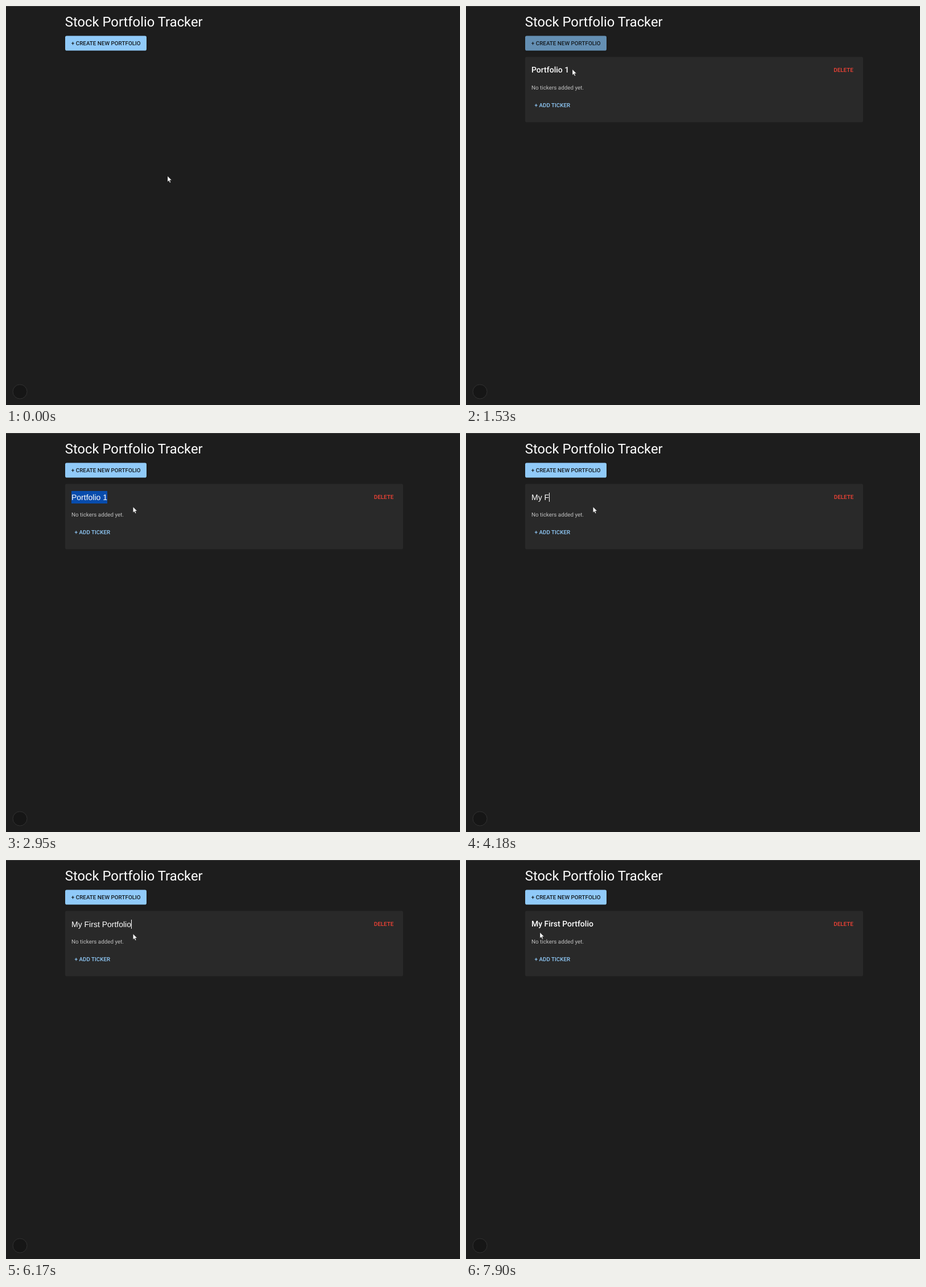
Recreate the animation shown at these times as an HTML page. Size 798 by 702 pixels, loop 8000 ms.

```html
<!DOCTYPE html>
<html lang="en">
<head>
<meta charset="utf-8">
<title>Stock Portfolio Tracker</title>
<style>
  html, body { margin: 0; width: 100%; height: 100%; overflow: hidden; background: #1d1d1d; }
  svg { display: block; }
  text { font-family: Roboto, sans-serif; text-rendering: geometricPrecision; }
  .label { font-size: 9.85px; font-weight: 500; }
  .button { filter: drop-shadow(0 1.4px 1.4px rgba(0, 0, 0, .25)); }
  #heading { font-size: 14px; font-weight: 500; }
  #input { font-family: "Liberation Sans", Arial, sans-serif; font-size: 14px; }
</style>
</head>
<body>
<svg width="798" height="702" viewBox="0 0 798 702">
  <rect width="798" height="702" fill="#1d1d1d"/>
  <rect width="798" height="1" fill="#3e3e3e"/>
  <text x="103.8" y="35.6" font-size="23.8" fill="#fff">Stock Portfolio Tracker</text>

  <rect id="create" class="button" x="104" y="52.5" width="143" height="26" rx="2.8"/>
  <text class="label" x="114.8" y="68.6" fill="#14191d">+ CREATE NEW PORTFOLIO</text>

  <g id="card">
    <rect x="104" y="89.5" width="594" height="115" rx="2.8" fill="#292929"/>
    <text id="heading" x="115" y="116.6" fill="#fff"></text>
    <g id="editor">
      <rect id="selection" x="115" y="102" height="22" fill="rgba(0,86,205,.8)"/>
      <text id="input" x="115" y="118" fill="#fff"></text>
      <rect id="caret" y="105" width="1" height="16" fill="#fff"/>
    </g>
    <text id="delete" class="label" y="116" fill="#f44336">DELETE</text>
    <text x="115" y="147" font-size="9.85" fill="#bfbfbf">No tickers added yet.</text>
    <text class="label" x="120.6" y="178" fill="#90caf9">+ ADD TICKER</text>
  </g>

  <circle cx="24.5" cy="678.5" r="12.5" fill="#161616" stroke="#393939" stroke-width=".8"/>

  <g id="arrow" stroke="#111" stroke-width=".4">
    <path d="M0 0V10L2.3 7.9 3.9 11.6 5.5 10.9 3.9 7.3H7.2Z" fill="#fff"/>
  </g>
  <g id="hand" stroke="#111" stroke-width=".5" stroke-linejoin="round">
    <path fill="#fff" d="M-1.1 .9Q0 -.6 1.1 .9V4.6Q2 3.9 2.9 4.9 3.9 4.5 4.5 5.4 5.6 5.1 6.1 6.3V9.6L5 12V13.8H-.9V12.4L-4 8.5Q-4.3 6.9 -2.8 7.1L-1.1 8.5Z"/>
    <path fill="none" d="M1.1 4.6V7M2.9 4.9V7M4.5 5.4V7.2"/>
  </g>
  <path id="beam" fill="none" stroke="#ddd" stroke-width=".8" d="M-1.8 -5H-.5L0 -4.5 .5 -5H1.8M0 -4.5V4.5M-1.8 5H-.5L0 4.5 .5 5H1.8"/>
</svg>
<script>
  const LOOP = 8000;
  const $ = id => document.getElementById(id);
  const show = (id, on) => $(id).setAttribute("display", on ? "inline" : "none");

  // Each track: [start time, ...values], held until the next entry
  const pointer = [
    [0, "arrow", 284, 299.3], [130, "arrow", 281, 294], [270, "arrow", 268, 273],
    [400, "arrow", 244, 235], [540, "arrow", 212, 183], [680, "arrow", 182, 134],
    [810, "arrow", 160, 97], [950, "hand", 149, 76], [1080, "hand", 146.3, 70],
    [1380, "hand", 150, 72], [1530, "arrow", 187, 111.5], [1650, "beam", 172, 111.5],
    [2070, "beam", 170.5, 111.5], [2360, "arrow", 223.3, 130],
    [7360, "arrow", 196, 120], [7500, "arrow", 128, 96], [7630, "arrow", 55, 81],
    [7770, "arrow", 92, 108], [7900, "arrow", 130, 127.5]
  ];
  const buttonFill = [[0, "#90caf9"], [950, "#80b4de"], [1080, "#6d9ec5"], [1380, "#6795b9"], [1530, "#648fb3"], [1650, "#90caf9"]];
  const typed = [
    [1950, "Portfolio 1"], [3530, "M"], [3800, "My "], [4180, "My F"], [4330, "My Fi"],
    [4480, "My Fir"], [4620, "My First"], [4760, "My First P"], [5070, "My First Por"],
    [5340, "My First Port"], [5500, "My First Portf"], [5670, "My First Portfo"],
    [5840, "My First Portfol"], [6000, "My First Portfoli"], [6170, "My First Portfolio"]
  ];
  const selectFrom = [[0, -1], [2800, 10], [2950, 0], [3530, -1]];
  const CARD_AT = 1230, EDIT_AT = 1950, CARET_OFF = 6630, SAVE_AT = 6750;

  const at = (track, t) => track.findLast(step => step[0] <= t) || track[0];

  function textWidth(text) {
    $("input").textContent = text.replaceAll(" ", "\u00a0");
    return text ? $("input").getComputedTextLength() : 0;
  }

  function drawEditor(t) {
    const text = at(typed, t)[1], from = at(selectFrom, t)[1];
    const left = from > 0 ? textWidth(text.slice(0, from)) : 0;
    const width = textWidth(text);
    $("selection").setAttribute("x", 115 + left);
    $("selection").setAttribute("width", width - left);
    $("caret").setAttribute("x", Math.round(114.9 + width));
    show("selection", from >= 0);
    show("caret", from < 0 && t < CARET_OFF);
  }

  function draw(t) {
    const editing = t >= EDIT_AT && t < SAVE_AT;
    $("create").setAttribute("fill", at(buttonFill, t)[1]);
    show("card", t >= CARD_AT);
    show("heading", !editing);
    show("editor", editing);
    $("heading").textContent = t < SAVE_AT ? "Portfolio 1" : "My First Portfolio";
    $("delete").setAttribute("x", editing ? 646.8 : 646.3);
    if (editing) drawEditor(t);

    const [, shape, x, y] = at(pointer, t);
    for (const id of ["arrow", "hand", "beam"]) show(id, id === shape);
    $(shape).setAttribute("transform", `translate(${x} ${y})`);
  }

  const start = performance.now();
  function tick() {
    draw((performance.now() - start) % LOOP);
    requestAnimationFrame(tick);
  }
  tick();
</script>
</body>
</html>
```
